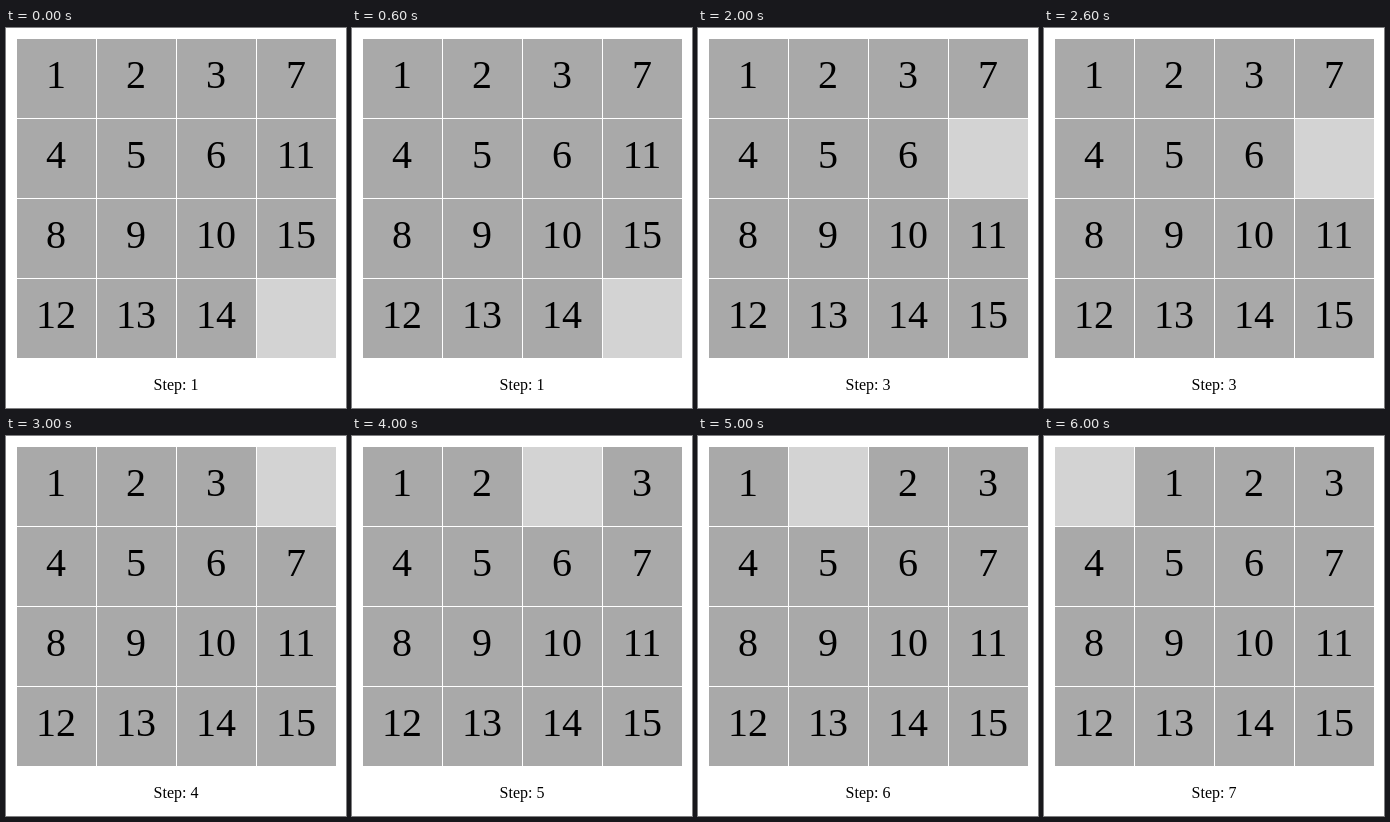
An HTML page for the animation above (7000 ms loop, 340 px wide and 380 px high).

```html
<!DOCTYPE html>
<html lang="en">
<head>
<meta charset="utf-8">
<title>Sliding puzzle</title>
<style>
  html, body { margin: 0; width: 100%; height: 100%; overflow: hidden; background: #fff; }
  svg { display: block; }
  text { font-family: "Liberation Serif", "Times New Roman", serif; text-anchor: middle; fill: #000; }
  .num { font-size: 40px; }
  .step { font-size: 16px; }
</style>
</head>
<body>
<svg id="stage" width="340" height="380" viewBox="0 0 340 380"></svg>
<script>
  const STEP_MS = 1000;
  const CELL = 80, PAD = 10;
  const START = [1, 2, 3, 7, 4, 5, 6, 11, 8, 9, 10, 15, 12, 13, 14, 0];
  const BLANKS = [15, 11, 7, 3, 2, 1, 0]; // path of the empty cell

  const stage = document.getElementById("stage");

  function add(tag, attrs) {
    const el = document.createElementNS("http://www.w3.org/2000/svg", tag);
    for (const key in attrs) el.setAttribute(key, attrs[key]);
    return stage.appendChild(el);
  }

  // Each board swaps the blank with its next neighbour.
  const boards = [START];
  for (let i = 1; i < BLANKS.length; i++) {
    const board = boards[i - 1].slice();
    board[BLANKS[i - 1]] = board[BLANKS[i]];
    board[BLANKS[i]] = 0;
    boards.push(board);
  }

  const cells = START.map((_, i) => {
    const x = PAD + (i % 4) * CELL;
    const y = PAD + Math.floor(i / 4) * CELL;
    return {
      rect: add("rect", { x: x + 1, y: y + 1, width: CELL - 1, height: CELL - 1 }),
      label: add("text", { class: "num", x: x + 40, y: y + 50 })
    };
  });
  const caption = add("text", { class: "step", x: 170, y: 362 });

  let shown = -1;
  function show(step) {
    if (step === shown) return;
    shown = step;
    boards[step].forEach((n, i) => {
      cells[i].rect.setAttribute("fill", n ? "#a9a9a9" : "#d3d3d3");
      cells[i].label.textContent = n || "";
    });
    caption.textContent = "Step: " + (step + 1);
  }

  const start = performance.now();
  function tick() {
    const t = performance.now() - start;
    show(Math.floor(t / STEP_MS) % boards.length);
    requestAnimationFrame(tick);
  }
  tick();
</script>
</body>
</html>
```
